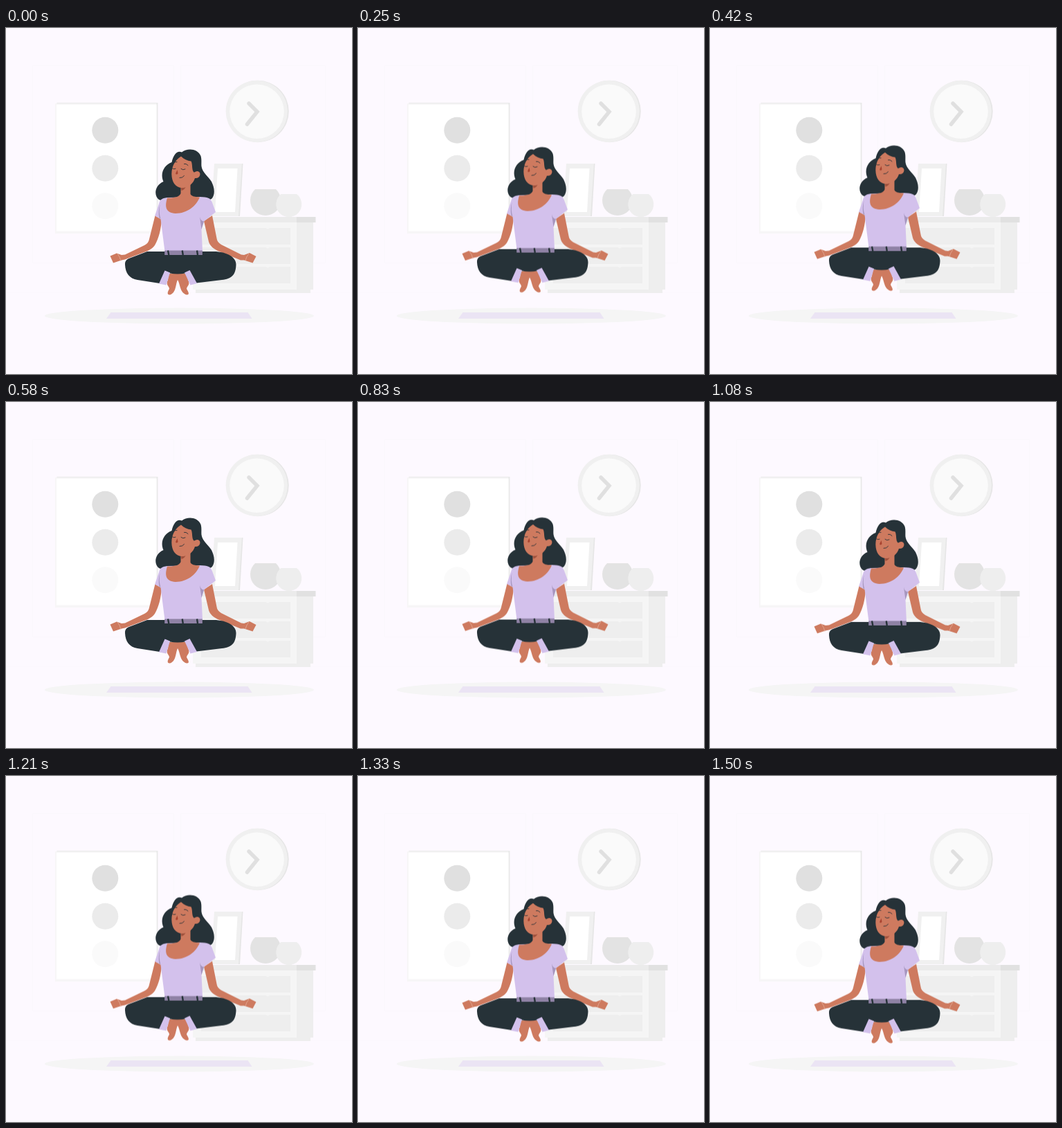
An HTML page for the animation above (1540 ms loop, 500x500 px).

```html
<!DOCTYPE html>
<html lang="en">
<head>
<meta charset="utf-8">
<title>Floating meditation</title>
<style>
  html, body { margin: 0; width: 100%; height: 100%; overflow: hidden; background: #fdf9ff; }
  svg { display: block; width: 100%; height: 100%; }
  .hair, .trousers { fill: #263238; }
  .skin { fill: #ce7a5f; }
  .shirt { fill: #d3c1ec; }
  .fold { fill: #a797bf; }
  .line { fill: none; stroke: #263238; stroke-width: .9; stroke-linecap: round; }
  .crease { fill: none; stroke: #e8b7a4; stroke-width: .7; }

  /* 37 poses per loop: 17 up, one held at the top, 18 down */
  .woman { animation: hover 1540ms -3ms infinite; }
  @keyframes hover {
    0% { transform: translateY(0); animation-timing-function: steps(17); }
    45.9459% { transform: translateY(-9.76px); animation-timing-function: steps(1); }
    48.6486% { transform: translateY(-9.76px); animation-timing-function: steps(18); }
    97.2973%, 100% { transform: translateY(.57px); }
  }
</style>
</head>
<body>
<svg viewBox="0 0 500 500">
  <defs>
    <path id="drawer" d="M282 289H376Q378 292 381 289H411V313H282Z" fill="#eeeeee"/>
  </defs>

  <g class="wall" fill="none" stroke="#faf7fc">
    <path d="M38.5 54.5H242.5V339.5H38.5ZM252.5 54.5H461.5V339.5H252.5Z"/>
    <path d="M0 382.5H500" stroke="#fbf8fd"/>
  </g>

  <g class="poster">
    <path d="M73 108H219.500V295L217 297Z" fill="#e9e9e9"/>
    <path d="M71 109H217.500V297H71Z" fill="#f7f6f7"/>
    <path d="M73 111H217.500V293.500H73Z" fill="#fff"/>
    <circle cx="143.300" cy="147.800" r="19" fill="#e0e0e0"/>
    <circle cx="143.300" cy="202.700" r="19" fill="#ebebeb"/>
    <circle cx="143.300" cy="257.300" r="19" fill="#fafafa"/>
  </g>

  <g class="clock">
    <circle cx="364" cy="120.500" r="44.700" fill="#e6e6e6"/>
    <circle cx="362.300" cy="120.500" r="44.700" fill="#f0f0f0"/>
    <circle cx="362.500" cy="120.800" r="39.300" fill="#fafafa"/>
    <path d="M351 109 363 121 348.500 139" fill="none" stroke="#e0e0e0" stroke-width="5.500" stroke-linecap="round"/>
  </g>

  <g class="photo">
    <path d="M302 196H342.500L338 272H300Z" fill="#e6e6e6"/>
    <path d="M301 196H341L336 272H296Z" fill="#f0f0f0"/>
    <path d="M306 203H334.500L331 266H302Z" fill="#fff"/>
  </g>
  <path d="M360 233H390A22 22 0 1 1 360 233Z" fill="#e3e3e3"/>
  <path d="M397.500 240H420A18.500 18.500 0 1 1 397.500 240Z" fill="#eeeeee"/>

  <g class="dresser">
    <path d="M274 377H440V383H274Z" fill="#eeeeee"/>
    <path d="M270 280H420V378H270Z" fill="#f5f5f5"/>
    <path d="M420 280H444V378H420Z" fill="#eeeeee"/>
    <path d="M268 273H420V281H268Z" fill="#ebebeb"/>
    <path d="M420 273H447.500V281H420Z" fill="#e1e1e1"/>
    <use href="#drawer"/>
    <use href="#drawer" y="28"/>
    <use href="#drawer" y="56"/>
  </g>

  <ellipse cx="250.500" cy="416" rx="194.500" ry="11.500" fill="#f5f5f5"/>
  <path d="M151.500 411H349.500L355.500 420H145Z" fill="#ebe4f4"/>

  <g class="woman">
    <path class="hair" d="M254 179.500C248 176.500 242 182 239.500 194C229 198 222 209 227.500 222C215 227 213 242 221 248C229 252 286 252 297 247C303 240 301 230 297 222C291 213 284 209 282.500 200C282 196 283 190 281.500 185C277 174 262 173 254 179.500Z"/>

    <path class="skin" d="M215.500 271 225 277C224 290 221 304 215 314C213 317 209 320 205 322L172 334.500 167 335.500 155 339.500 150.500 329.500 160 325.500 167 328 172 327.500 200 314C205 311 206 309 207 305Z"/>
    <path class="skin" d="M286 279 298 271 304.500 304C305 308 307 310 311 313L340 327.500 344 328 352 325 361.500 330 356.500 339.500 344 335.500 339 335.500 306 322C300 319 295 315 293 309Z"/>
    <path class="crease" d="M161 326Q165 331 166 337M351 326Q347 331 346 336"/>

    <path class="skin" d="M235 355H249L248 364C245 370 246 383 237 385.500C232 386 233.500 381 236 377C236 373 230 371 234 364ZM248.500 355H262L263 364C267 371 261 373 261 377C263.500 381 266 386 261 385.500C251 383 252 370 248 364Z"/>
    <path class="trousers" d="M204 323H300C320 323 333 332 332.500 342C332 357 326 362.500 312 364L275 368.500 262 352 259 354.500Q248 356.500 237 354.500L230 351 222 369 190 364C178 362 172.500 354 172 342C171.500 334 178 333 183 331Z"/>
    <path class="shirt" d="M229.500 350.500 237 353.500 231.500 371.500 221 369.500ZM265.500 350 276 369 266.500 371.500 258 353.500Z"/>

    <path class="shirt" d="M233 245C225 246 222.500 248 221 254L215 271.500 223.500 276 229.500 323H284L282.500 291 286.500 279 303 266 297.500 251C295 245.500 292 244.500 280 244Z"/>
    <path class="fold" d="M222.500 255Q220.500 266 223.500 276L221.500 274.500Q219.500 265 222.500 255ZM280 273Q282 280 286 279L282.500 291Z"/>
    <path d="M229.200 321.500H283.800V328H229.200Z" fill="#8f82a5"/>
    <path d="M234 321.500 235.300 328M254.700 321.500 255.800 328M276 321.500 277 328" stroke="#263238" stroke-width="2.400"/>

    <path class="skin" d="M252.500 226 266.500 222V240Q268 244 280 244.500C275 257 262 268 245 268C231 267 229 259 233 245.500Q250 246 252.500 239Z"/>
    <path d="M253 231Q257 231 260 229Q258 234 253.500 235Z" fill="#9f513d"/>
    <path class="skin" d="M253 185.500C245 190 239.500 199 239.300 211C239.500 223 245 230.500 254 231C264 231 271 224 273 217C281 218 283 208 277 207C274 206.700 273 209 271.500 208.500C268 205 270 197 267.500 192.500C262 192 257 189.500 253 185.500Z"/>
    <path class="line" d="M240.500 203Q242.500 204.500 245 203.300M253 203.500Q255.500 206 259 204M257.500 196.300Q260.500 195.500 263 198.500M243 194.500Q244.500 193 247 193.500M251 216.500Q255 217 257.500 213.500"/>
    <path d="M247.500 205C246.500 208 244 210.500 246 211.500Q248 211.500 248.500 210Z" fill="#a8432f"/>
  </g>
</svg>
</body>
</html>
```
